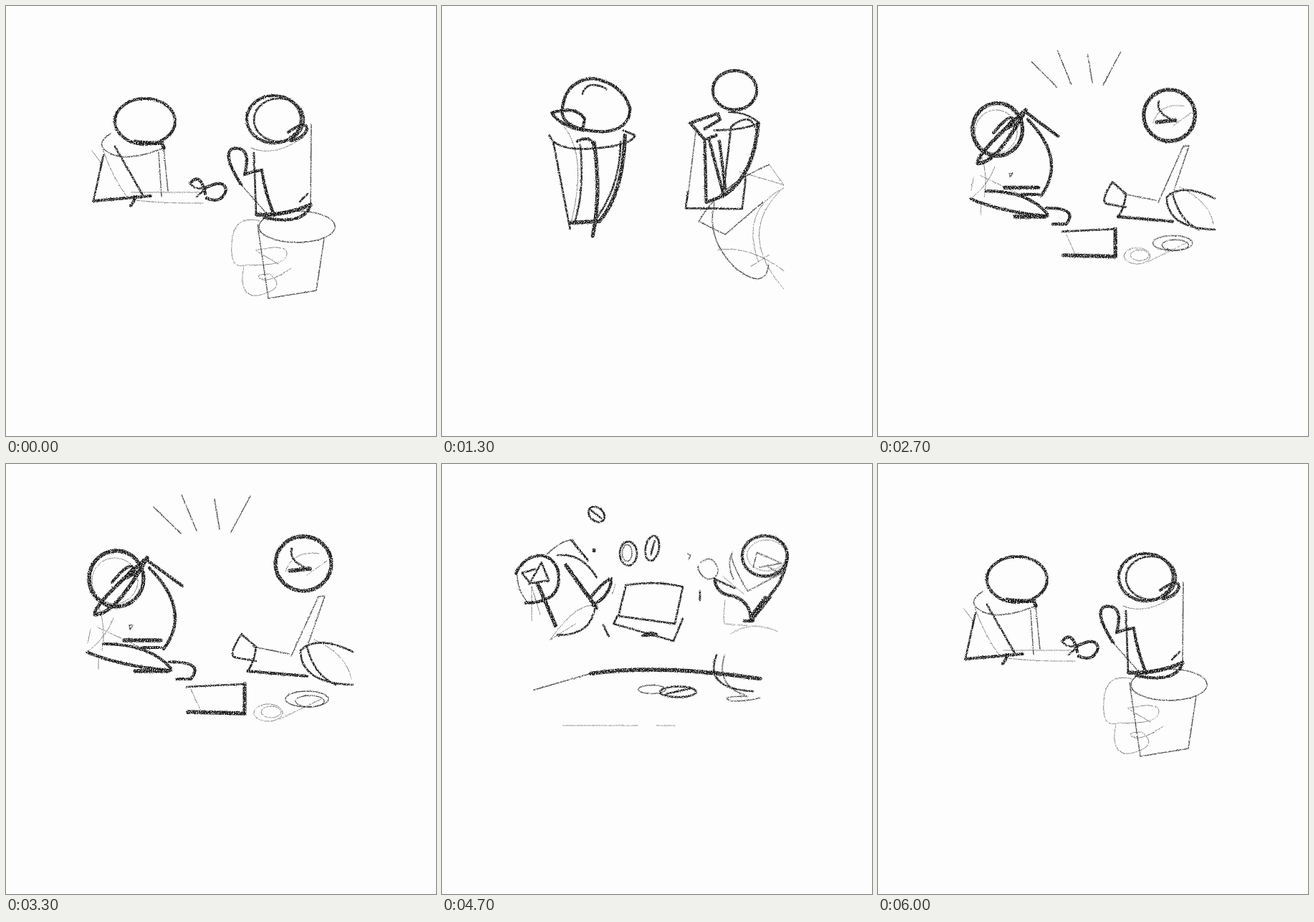
Animation of 600 by 600 pixels, one loop 6.3 s. Source, as an HTML page:

```html
<!DOCTYPE html>
<html lang="en">
<head>
<meta charset="utf-8">
<title>Pencil storyboard</title>
<style>
html, body { margin: 0; width: 100%; height: 100%; overflow: hidden; background: #fefdfe; }
svg { display: block; width: 600px; height: 600px; }
path, ellipse {
  fill: none; stroke: #161616; stroke-linecap: round; stroke-linejoin: round;
  vector-effect: non-scaling-stroke;
}
.faint { stroke-width: 1px; opacity: .55; }
.thin { stroke-width: 1.5px; opacity: .75; }
.mid { stroke-width: 2.7px; opacity: .92; }
.bold { stroke-width: 4.2px; opacity: .95; }
.heavy { stroke-width: 5.3px; opacity: .95; }
</style>
</head>
<body>
<svg viewBox="0 0 600 600">
<filter id="pencil" filterUnits="userSpaceOnUse" x="0" y="0" width="600" height="600" color-interpolation-filters="sRGB">
  <feTurbulence type="fractalNoise" baseFrequency=".7" numOctaves="2" seed="4" result="noise"/>
  <feColorMatrix in="noise" values="0 0 0 0 0  0 0 0 0 0  0 0 0 0 0  5 0 0 0 -1.4" result="grain"/>
  <feDisplacementMap in="SourceGraphic" in2="noise" scale="2.5" xChannelSelector="R" yChannelSelector="G"/>
  <feComposite in2="grain" operator="in"/>
</filter>
<g id="stage" filter="url(#pencil)">

<g id="sit">
  <ellipse class="bold" cx="194" cy="161" rx="42" ry="32"/>
  <path class="heavy" d="M180 189q18 3 38 2l2 7"/>
  <path class="thin" d="M146 178q-25 16 0 28t74-8M213 204l4 62M220 198l6 60"/>
  <path class="mid" d="M136 208l-14 64M152 196l39 68"/>
  <path class="bold" d="M122 272l80-7M170 268l12-2-8 13"/>
  <path class="faint" d="M120 202l15 20M135 200q14 40 35 68M175 260h95M180 271q45 5 95 4"/>
  <path class="bold" d="M259 245q13-12 19 17M276 255q30-16 31 3-7 19-27 10"/>
  <path class="mid" d="M256 247q10 12 26 5l-16 14"/>
  <ellipse class="bold" cx="374" cy="158" rx="38" ry="33"/>
  <ellipse class="mid" cx="381" cy="159" rx="35" ry="30"/>
  <path class="bold" d="M394 176q26-18 26-4-4 12-22 16"/>
  <path class="faint" d="M342 198q33 14 73-15"/>
  <path class="thin" d="M426 165l-1 113M328 249l36 41"/>
  <path class="heavy" d="M350 291q40 2 75-14"/>
  <path class="bold" d="M360 295q55 12 65-17"/>
  <path class="mid" d="M410 273l11-11M346 205l3 86"/>
  <path class="bold" d="M328 249q-27-42-12-50 28-4 17 36l13-4 11-2q4 30 17 63"/>
  <ellipse class="thin" cx="406" cy="308" rx="53" ry="22"/>
  <path class="thin" d="M351 305l15 103 67-11 11-73"/>
  <path class="faint" d="M354 300q-36-10-39 30t20 31q57 3 57-16 0-14-44-4l32 19"/>
  <path class="faint" d="M332 362q-9 45 20 42 42-10 16-30-25 0-10 8 15 2 40-16"/>
</g>

<g id="turn">
  <path class="bold" d="M180 99q-30 4-35 46 15 20 60 8 15-40-25-54"/>
  <ellipse class="mid" cx="170" cy="173" rx="45" ry="12"/>
  <path class="bold" d="M140 252q2-80 21-80 5 64 14 128"/>
  <path class="thin" d="M135 185l2 115M206 186l-1 94M220 190l-7 82"/>
  <path class="faint" d="M229 192l-6 70M150 296h55M145 266h95"/>
  <path class="mid" d="M138 309v-11h37M208 290q60-14 62-4-20 6-62 5M215 273q55-12 73 13l-31-19 5 16"/>
  <ellipse class="bold" cx="394" cy="144" rx="38" ry="33"/>
  <ellipse class="mid" cx="391" cy="146" rx="34" ry="30"/>
  <ellipse class="bold" cx="404" cy="184" rx="41" ry="12"/>
  <path class="bold" d="M437 176l-8 116-79-3M322 208q34 40 46 76M334 203l-7-18-26-4 19 27 30-5"/>
  <path class="heavy" d="M392 204q-8 56-30 82"/>
  <path class="mid" d="M327 213l23 72"/>
  <path class="faint" d="M352 178l13 107M390 195l-40 65M297 241h15M297 253h15"/>
  <ellipse class="thin" cx="409" cy="302" rx="63" ry="65"/>
  <path class="thin" d="M452 320q12-8 11 10M345 250q-36 30-36 60 0 45 13 48l53 5"/>
  <path class="thin" d="M357 290l-15 129h101l20-97M341 331q48-22 52 39M341 331l37 31"/>
  <path class="thin" d="M390 375q-88-2-88 9 0 17 68 24l2-34M350 298q20 30 62 50"/>
  <path class="faint" d="M448 250q14-9 29-11M474 292l4-6M404 267q16 8 20 23"/>
</g>

<g id="stand">
  <path class="bold" d="M200 94q-40 2-43 46 3 26 58 27 35-3 35-32-10-34-50-41"/>
  <path class="bold" d="M143 141q35-10 45 9l-3 15q-30-6-42-24"/>
  <path class="mid" d="M185 115q6-20 33-7M140 172q8 22 60 18t57-18l-17-7"/>
  <path class="mid" d="M145 180l23 120M182 185q6 60-7 105M237 180q0 60-32 105"/>
  <path class="faint" d="M160 160q32 40 10 130"/>
  <path class="heavy" d="M201 182q10 70-2 128M243 172q-2 80-35 118l-40 2"/>
  <path class="bold" d="M178 180q20-10 24 10"/>
  <ellipse class="bold" cx="393" cy="110" rx="30" ry="27"/>
  <path class="mid" d="M385 140q25 0 41 15-20 10-61 10M388 160q25-20 32 0M388 160l-10 85"/>
  <path class="bold" d="M352 163l21-13-3-8-38 13 20 23 16-6M352 178l2 86 24-9-20-77M372 180l8 65"/>
  <path class="heavy" d="M425 155q-5 70-45 98"/>
  <path class="mid" d="M329 250l-3 22 77 1 5-43"/>
  <path class="thin" d="M340 165l-12 97"/>
  <path class="thin" d="M440 212q-70 30-96 78l36 18 51-44M365 265q-12 50 30 90 40 30 44-5"/>
  <path class="faint" d="M370 329q45-6 90 29M460 244q-60 30-35 101M455 248q-60 60 5 135"/>
  <path class="faint" d="M400 222l60 18-20-28M415 352l25-16"/>
</g>

<g id="burst">
  <ellipse class="heavy" cx="154" cy="160" rx="38" ry="39"/>
  <ellipse class="faint" cx="152" cy="163" rx="32" ry="32"/>
  <path class="bold" d="M148 165q25-30 30-20l-13 15 20-10-13 22"/>
  <path class="heavy" d="M197 131q-45 80-73 79-2-14 73-79M165 246h51M180 289h46"/>
  <path class="bold" d="M198 135l48 35M200 145q60 60 20 113M190 256h26"/>
  <path class="bold" d="M114 263q50 20 116 25M136 251q65 0 94 34M228 276q50 0 30 24h-20"/>
  <path class="faint" d="M130 200q10 30 4 60M114 262q26-20 36-47M118 230l-4 20M129 272v14M128 228l60 28"/>
  <path class="thin" d="M172 225h5l-4 6zM206 60l38 37M245 43l21 50M291 49l7 42M341 45l-27 50"/>
  <ellipse class="heavy" cx="415" cy="139" rx="39" ry="38"/>
  <path class="heavy" d="M396 149l28-3"/>
  <path class="mid" d="M399 118q-6 18 26 30"/>
  <path class="faint" d="M390 150q10-30 47-25M420 155l28-20"/>
  <path class="thin" d="M398 268l38-83 9-1-23 66M345 255l50 10"/>
  <path class="mid" d="M329 237q-20 30-9 33l29 5M329 238l20 17q-2 20-11 33"/>
  <path class="bold" d="M337 289l83 7"/>
  <path class="mid" d="M484 262q-50-24-73-2 0 46 73 48M420 255q10 40 40 53"/>
  <path class="faint" d="M430 245q45 20 52 55M258 314l14 31M382 356l58-28"/>
  <path class="mid" d="M252 311l81-4"/>
  <path class="heavy" d="M333 307v41l-79-2"/>
  <ellipse class="faint" cx="366" cy="347" rx="20" ry="12"/>
  <ellipse class="faint" cx="370" cy="346" rx="14" ry="8"/>
  <ellipse class="thin" cx="420" cy="328" rx="30" ry="11"/>
  <ellipse class="thin" cx="424" cy="331" rx="20" ry="8"/>
</g>

<g id="cheer">
  <path class="bold" d="M82 160q15-30 43-30 30 8 27 45-4 35-54 35"/>
  <path class="thin" d="M84 158q0 30 16 49M133 128q24-24 42-24l25 36"/>
  <path class="mid" d="M113 153l-21 7 14 17 30-5-12-30-20 36"/>
  <path class="heavy" d="M118 178l29 70M164 147l50 71M210 121v1"/>
  <path class="mid" d="M172 104l28 34M150 130q40-5 64 37M212 215q-6 50-62 49"/>
  <path class="bold" d="M205 200q20-26 33-31 0 28-30 45"/>
  <path class="faint" d="M108 240v-58l14 48M138 272q45-65 74-57M138 272l42-27M245 178l-5 17"/>
  <ellipse class="mid" cx="214" cy="61" rx="15" ry="11" transform="rotate(45 214 61)"/>
  <ellipse class="mid" cx="266" cy="127" rx="14" ry="20"/>
  <ellipse class="thin" cx="264" cy="126" rx="8" ry="14"/>
  <ellipse class="mid" cx="305" cy="118" rx="11" ry="21" transform="rotate(10 305 118)"/>
  <path class="mid" d="M205 54l17 14M303 128l6-22M225 247l9 19"/>
  <path class="mid" d="M355 183l-13 62-92-13 12-52q50-8 93 3M248 232l-6 13 98 29 15-38"/>
  <path class="bold" d="M290 265l22-2-10-3z"/>
  <ellipse class="bold" cx="489" cy="131" rx="37" ry="34"/>
  <ellipse class="faint" cx="492" cy="130" rx="32" ry="26"/>
  <path class="thin" d="M470 150l6-25 40 18-36 7M495 150l21 10-55 30q-32-55-25-65-10 20 2 45"/>
  <path class="thin" d="M384 142q20-16 28 10 2 18-17 18-15-8-15-22M363 127l5 3-4 7"/>
  <path class="bold" d="M526 130q-4 40-28 66M407 170q2 25 30 28 28 10 30 40M468 230l22-30M455 240h15"/>
  <path class="heavy" d="M466 240l31-40"/>
  <path class="mid" d="M407 170l33 15M383 190v15"/>
  <path class="faint" d="M420 165l35 30M424 205q-4 40 0 40l36 3M433 262q35-24 77-4"/>
</g>

<g id="table">
  <path class="thin" d="M108 349l92-34"/>
  <path class="heavy" d="M200 315q110-20 272 11"/>
  <ellipse class="thin" cx="298" cy="348" rx="22" ry="9"/>
  <ellipse class="mid" cx="340" cy="353" rx="29" ry="11"/>
  <path class="mid" d="M322 357l38-11M402 276q-22 70 58 76"/>
  <path class="thin" d="M415 276q-16 66 37 86M472 365q-20 8-47 7-20-10 25-10"/>
  <path class="faint" opacity=".4" d="M155 423h120M305 423h30"/>
</g>

<g id="settle">
  <ellipse class="bold" cx="168" cy="185" rx="43" ry="42"/>
  <path class="bold" d="M135 217q40 20 77-17M187 230q4 44-9 74"/>
  <path class="mid" d="M140 225q70 6 85-18M212 220l-11 82M134 316l26-18M195 304l50-8"/>
  <path class="faint" d="M133 222l-1 88"/>
  <path class="thin" d="M170 230l-35 82M145 300l15-18"/>
  <ellipse class="bold" cx="174" cy="307" rx="26" ry="10"/>
  <path class="bold" d="M134 316q10 22 121 6M245 296l27 19-18 8-7-23"/>
  <path class="bold" d="M326 328l-46-12-3-4 23 10h34M318 332q48-2 42 5-6 36-50 29"/>
  <path class="bold" d="M279 330l52 27-31 9M286 370q36 8 26-7-26-4-26 7"/>
  <path class="mid" d="M279 330l11 40"/>
  <ellipse class="mid" cx="435" cy="184" rx="26" ry="19"/>
  <path class="thin" d="M415 165q-60 16 10 39M406 196l2 87"/>
  <path class="bold" d="M405 202q6-22 27 0 48 26 18 91M344 294q50-10 106 0M370 298l75 2"/>
  <path class="heavy" d="M453 240l-21 62"/>
  <path class="mid" d="M456 255l-16 45"/>
  <ellipse class="bold" cx="366" cy="296" rx="22" ry="7"/>
  <ellipse class="thin" cx="430" cy="331" rx="46" ry="54"/>
  <path class="faint" d="M438 225l-8 55M388 290q-6 40-4 60 40 22 94 12M375 340l9 10M465 240q10-6 15 7"/>
  <path class="thin" d="M371 312l-8 96 70-2-1-14 21-39M314 425l36 1"/>
</g>

</g>
</svg>
<script>
const stage = document.getElementById('stage');
const scenes = [...stage.children];
const extents = new Map(scenes.map(s => [s.id, s.getBBox()]));

// Scenes per drawing, each optionally fitted to left, top, right, bottom
const drawings = [
  { sit: [] },
  { turn: [113, 75, 460, 419] },
  { turn: [] },
  { turn: [147, 89, 479, 413] },
  { stand: [150, 90, 477, 395] },
  { stand: [] },
  { stand: [121, 86, 460, 383] },
  { stand: [124, 59, 479, 415] },
  { burst: [130, 62, 470, 360] },
  { burst: [128, 48, 468, 387] },
  { burst: [] },
  { cheer: [108, 90, 484, 275], table: [] },
  { cheer: [88, 80, 521, 275], table: [] },
  { cheer: [], table: [] },
  { cheer: [103, 55, 482, 247], table: [128, 266, 444, 365] },
  { settle: [118, 54, 481, 365] },
  { settle: [] },
  { sit: [123, 49, 470, 408] },
  { sit: [] }
];

function fit(box, [left, top, right, bottom]) {
  const sx = (right - left) / box.width, sy = (bottom - top) / box.height;
  return `translate(${left} ${top}) scale(${sx} ${sy}) translate(${-box.x} ${-box.y})`;
}

function show(drawing) {
  for (const scene of scenes) {
    const target = drawing[scene.id];
    scene.style.display = target ? '' : 'none';
    if (!target) continue;
    scene.setAttribute('transform', target.length ? fit(extents.get(scene.id), target) : '');
  }
}

let shown;

// Three drawings a second, held for 300, 400 and 300 ms
function tick() {
  const time = performance.now() % 6300, beat = time % 1000;
  const index = Math.floor(time / 1000) * 3 + (beat >= 300) + (beat >= 700);
  if (index !== shown) show(drawings[shown = index]);
  requestAnimationFrame(tick);
}
tick();
</script>
</body>
</html>
```
